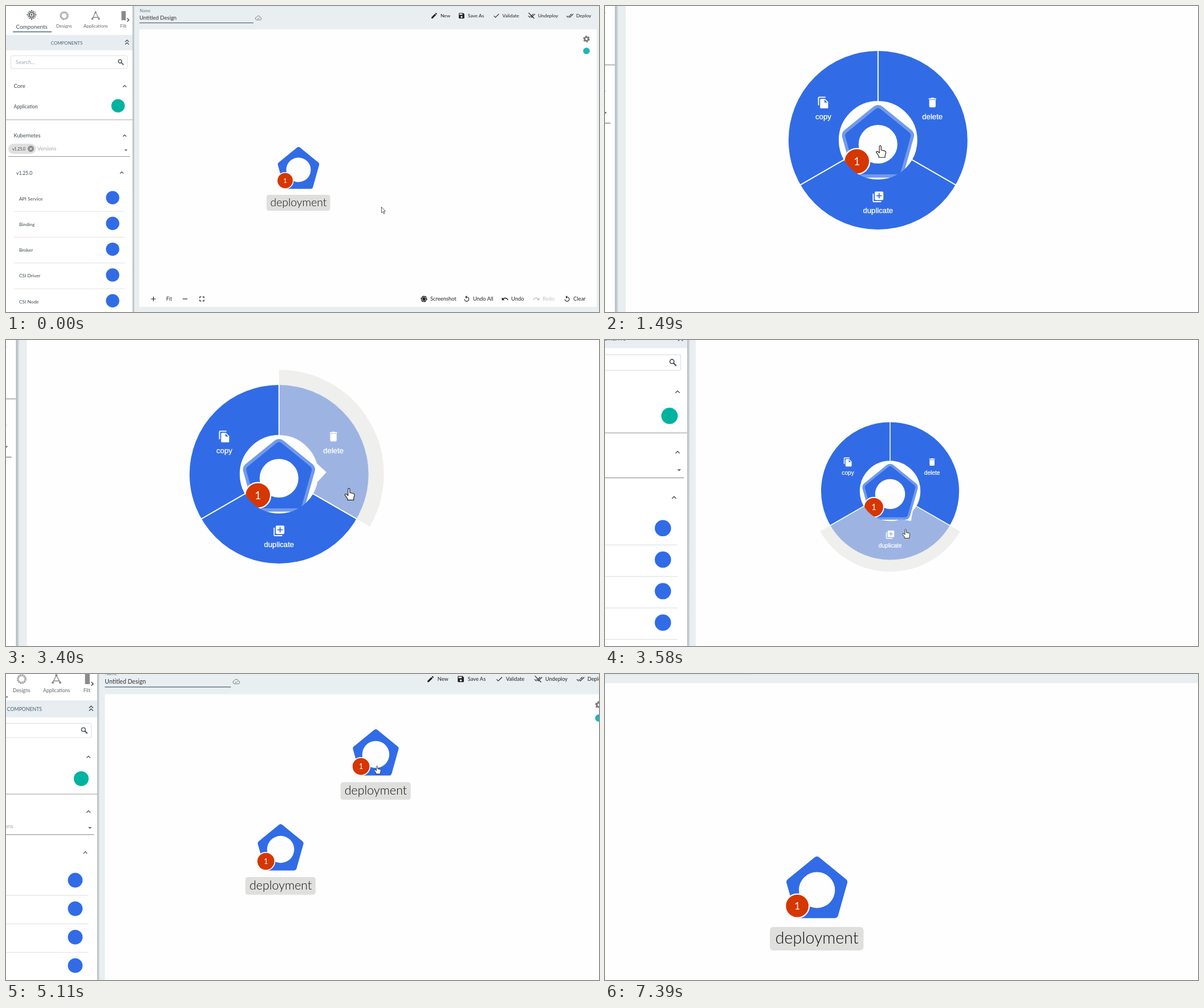
Write an HTML page that moves like this. It is 1040 px wide and 538 px high and loops after 8050 ms.

```html
<!DOCTYPE html>
<html lang="en">
<head>
<meta charset="utf-8">
<title>Design canvas</title>
<style>
  html, body { margin: 0; width: 100%; height: 100%; overflow: hidden; background: #fefefe; }
  svg { display: block; width: 100%; height: 100%; }
  text { font-family: Lato, sans-serif; white-space: pre; }
  .menu text { font-family: "Liberation Sans", Arial, sans-serif; stroke: #fff; stroke-width: .2px; }
</style>
</head>
<body>
<svg id="stage" viewBox="0 0 1040 538" xmlns="http://www.w3.org/2000/svg"></svg>
<script>
const LOOP = 8050;
const BLUE = '#316ce6', INK = '#3c494f', SLATE = '#607d8b';
const CENTER = [513, 283.6];
const COPY_SHIFT = [151, -151];
const SPOT = 43.5, RIM = 99, GLOW = 116;

const ICONS = {
  edit: 'M3 17.25V21h3.75L17.81 9.94l-3.75-3.75L3 17.25zM20.71 7.04c.39-.39.39-1.02 0-1.41l-2.34-2.34c-.39-.39-1.02-.39-1.41 0l-1.83 1.83 3.75 3.75 1.83-1.83z',
  save: 'M17 3H5c-1.11 0-2 .9-2 2v14c0 1.1.89 2 2 2h14c1.1 0 2-.9 2-2V7l-4-4zm-5 16c-1.66 0-3-1.34-3-3s1.34-3 3-3 3 1.34 3 3-1.34 3-3 3zm3-10H5V5h10v4z',
  check: 'M9 16.2L4.8 12l-1.4 1.4L9 19 21 7l-1.4-1.4z',
  checks: 'M18 7l-1.41-1.41-6.34 6.34 1.41 1.41zM22.24 5.59L11.66 16.17 7.48 12l-1.41 1.41L11.66 19l12-12zM.41 13.41L6 19l1.41-1.41L1.83 12z',
  plus: 'M19 13h-6v6h-2v-6H5v-2h6V5h2v6h6z',
  minus: 'M19 13H5v-2h14z',
  full: 'M7 14H5v5h5v-2H7zM5 10h2V7h3V5H5zM17 17h-3v2h5v-5h-2zM14 5v2h3v3h2V5z',
  undo: 'M12.5 8c-2.65 0-5.05.99-6.9 2.6L2 7v9h9l-3.62-3.62c1.39-1.16 3.16-1.88 5.12-1.88 3.54 0 6.55 2.31 7.6 5.5l2.37-.78C21.08 11.03 17.15 8 12.5 8z',
  replay: 'M12 5V1L7 6l5 5V7c3.31 0 6 2.69 6 6s-2.69 6-6 6-6-2.69-6-6H4c0 4.42 3.58 8 8 8s8-3.58 8-8-3.58-8-8-8z',
  copy: 'M16 1H4c-1.1 0-2 .9-2 2v14h2V3h12zM15 5l6 6v10c0 1.1-.9 2-2 2H8c-1.1 0-2-.9-2-2V7c0-1.1.9-2 2-2zm-1 7h5.5L14 6.5z',
  trash: 'M6 19c0 1.1.9 2 2 2h8c1.1 0 2-.9 2-2V7H6zM19 4h-3.5l-1-1h-5l-1 1H5v2h14z',
  duplicate: 'M4 6H2v14c0 1.1.9 2 2 2h14v-2H4zM20 2H8c-1.1 0-2 .9-2 2v12c0 1.1.9 2 2 2h12c1.1 0 2-.9 2-2V4c0-1.1-.9-2-2-2zm-1 9h-4v4h-2v-4H9V9h4V5h2v4h4z'
};

const text = (x, y, size, str, fill = INK, more = '') =>
  `<text x="${x}" y="${y}" font-size="${size}" fill="${fill}" ${more}>${str}</text>`;
const rect = (x, y, w, h, fill, more = '') =>
  `<rect x="${x}" y="${y}" width="${w}" height="${h}" fill="${fill}" ${more}/>`;
const disc = (x, y, r, fill, more = '') => `<circle cx="${x}" cy="${y}" r="${r}" fill="${fill}" ${more}/>`;
const line = (d, stroke = INK, width = 1) =>
  `<path d="${d}" fill="none" stroke="${stroke}" stroke-width="${width}"/>`;
const icon = (name, x, y, size, fill = '#222', flip = 1) =>
  `<path d="${ICONS[name]}" fill="${fill}" transform="translate(${x} ${y}) scale(${flip * size / 24} ${size / 24}) translate(-12 -12)"/>`;
const chevron = (x, y) => line(`M${x - 3} ${y + 2}l3-3 3 3`, INK, 1.1);
const middle = 'text-anchor="middle"';

function tabs() {
  const arms = [0, 90, 180, 270].map(a => `<g transform="rotate(${a} 45 15.5)">` +
    line('M45 11V7.5M43 11V9.5H40M47 11V9.5H50', INK, 1) +
    disc(45, 8, 1.1, INK) + '</g>').join('');
  const blades = [0, 60, 120, 180, 240, 300].map(a =>
    `<path d="M98.5 13.5L105 10.5" stroke="#999" transform="rotate(${a} 102 17)"/>`).join('');
  return rect(41.5, 12, 7, 7, '#fff', `stroke="${INK}" stroke-width="1.3"`) + arms +
    disc(45, 15.5, 1.4, INK) +
    disc(102, 17, 6.7, 'none', 'stroke="#999" stroke-width="1.8" stroke-dasharray="2.6 .9"') + blades +
    line('M157 11L151.5 22M157 11L163 22M152 20H162', '#888', 1.3) +
    disc(157, 11, 1.8, '#888') + disc(151.5, 22.5, 1.8, '#888') + disc(163, 22.5, 1.8, '#888') +
    rect(202.5, 9, 7.5, 16, '#8a8a8a') + line('M212.5 21.5l3 3-3 3', '#333', 1.2) +
    text(17.5, 40, 9.9, 'Components') + text(88, 37.5, 8, 'Designs', '#666') +
    text(136, 37.5, 7.9, 'Applications', '#666') + text(200, 37.5, 8, 'Filt', '#666') +
    rect(12, 44.5, 68, 1.8, SLATE);
}

function sidebar() {
  const rows = ['API Service', 'Binding', 'Broker', 'CSI Driver', 'CSI Node'].map((name, i) => {
    const y = 337 + 45.3 * i;
    return text(23, y + 4.5, 8.3, name) + disc(187, y, 11.7, BLUE) +
      (i < 4 ? rect(14, y + 23.7, 194, 1, '#e2e2e2') : '');
  }).join('');
  return rect(0, 0, 222, 538, '#fff') + tabs() +
    rect(0, 51, 222, 27, '#e8edf1') + text(106.5, 67.5, 7.9, 'COMPONENTS', '#47626f', middle) +
    line('M209 63l3.2-3.2 3.2 3.2M209 67.5l3.2-3.2 3.2 3.2', INK, 1.2) +
    rect(8.5, 87.5, 204, 22.5, '#fff', 'rx="2" stroke="#dcdfe1"') +
    text(17, 102, 9.2, 'Search...', '#a3a8ab') +
    disc(200, 97.3, 3, 'none', `stroke="${INK}" stroke-width="1.3"`) + line('M202.2 99.5l4 4', INK, 1.7) +
    text(13.5, 144, 9.7, 'Core') + chevron(208, 140.5) +
    text(13.5, 180, 8.5, 'Application') + disc(196.5, 175.5, 11.8, '#00b39f') +
    rect(0, 199.5, 222, 1, '#a5a5a5') +
    text(13.5, 231, 9.3, 'Kubernetes') + chevron(208, 227.5) +
    rect(4, 242, 48.5, 18, '#e0e0e0', 'rx="9"') + text(11, 253.7, 7, 'v1.25.0') +
    disc(43.5, 251, 5.4, '#888') + line('M41.5 249l4 4M45.5 249l-4 4', '#e0e0e0', 1.2) +
    text(55, 254.3, 9, 'Versions', '#a3a8ab') + `<path d="M207.5 252.3h5.6l-2.8 2.9z" fill="#666"/>` +
    rect(4, 264.1, 213, 1, '#929292') +
    text(18, 296.5, 8.5, 'v1.25.0') + chevron(203, 292.5) + rows +
    rect(222, 0, 4, 538, 'url(#edge)');
}

function header() {
  const tools = [['edit', 751, 762, 'New'], ['save', 799, 810, 'Save As'], ['check', 860, 870.5, 'Validate'],
    ['checks', 922, 933, 'Undeploy'], ['checks', 989, 1000, 'Deploy']];
  return text(234.5, 10.8, 7.3, 'Name', SLATE) + text(234, 24, 9.5, 'Untitled Design', '#333') +
    rect(234, 29, 200, 1.2, '#536b78') +
    line('M439.5 24.5a2.7 2.7 0 0 1-.2-5.2 3.7 3.7 0 0 1 6.7.5 2.4 2.4 0 0 1 0 4.7zM440.5 21.3l1.7 1.6 2.7-2.8', '#777', .9) +
    tools.map(([name, ix, tx, label]) => icon(name, ix, 17, 13) + text(tx, 20, 8.4, label, '#222')).join('') +
    line('M916.5 12l10 10', '#222', 1.1);
}

function toolbar() {
  const tools = [['replay', 808, 819, 'Undo All'], ['undo', 875, 886, 'Undo'],
    ['undo', 930, 941, 'Redo', '#c4c4c4', -1], ['replay', 984, 995, 'Clear']];
  const blades = [0, 60, 120, 180, 240, 300].map(a =>
    `<path d="M731 513L735 509" stroke="#fefefe" stroke-width=".8" transform="rotate(${a} 733 515)"/>`).join('');
  return icon('plus', 258.5, 515, 14) + icon('minus', 314, 515, 14) + icon('full', 343.5, 515, 14.5) +
    text(281, 518, 8.6, 'Fit', '#222') +
    disc(733, 515, 5.6, '#222') + blades + text(744, 518, 9.4, 'Screenshot', '#222') +
    tools.map(([name, ix, tx, label, fill = '#222', flip = 1]) =>
      icon(name, ix, 515, 13, fill, flip) + text(tx, 518, 9.4, label, fill)).join('');
}

function workspace() {
  return rect(222, 0, 818, 538, '#e9eef1') + rect(222, 0, 818, 1, '#dde3e6') +
    rect(234, 41, 802, 488, '#fefefe', 'rx="1"') + header() + toolbar() +
    disc(1018, 58, 3.3, 'none', 'stroke="#777" stroke-width="2.6"') +
    disc(1018, 58, 5.1, 'none', 'stroke="#777" stroke-width="1.6" stroke-dasharray="2.67"') +
    disc(1018, 79, 5.8, '#20b5b5');
}

function node(id) {
  const body = 'M513 252.5L544.8 278.5 534 317H492L481.2 278.5Z';
  const shape = (color, width) =>
    `<path d="${body}" fill="${color}" stroke="${color}" stroke-width="${width}" stroke-linejoin="round"/>`;
  return `<g id="${id}">${rect(457, 332, 111.5, 28, '#dfdfde', 'rx="4"')}
    ${text(513, 352, 19.4, 'deployment', '#111', middle + ' font-weight="300"')}
    <g class="selected">${shape('#719aeb', 16)}</g>${shape(BLUE, 9)}${disc(513, 288, 21.5, '#fefefe')}
    ${disc(489.6, 307, 14.2, '#d63600', 'stroke="#fff" stroke-width="1.5"')}
    ${text(489.6, 311.2, 12, '1', '#fff', middle)}</g>`;
}

function menu() {
  const ringRadius = (SPOT + RIM) / 2, glowRadius = (SPOT + GLOW) / 2;
  const spokes = [0, 120, 240].map(a =>
    `<path d="M0 ${-SPOT}V${-RIM}" stroke="#fff" stroke-width="1.25" transform="rotate(${a})"/>`).join('');
  const command = (name, x, y, label) =>
    icon(name, x, y, 14.2, '#fff') + text(x, y + 18.2, 8.3, label, '#fff', middle);
  return `<g id="menu" class="menu"><g mask="url(#notch)">
    ${disc(0, 0, ringRadius, 'none', `stroke="${BLUE}" stroke-width="${RIM - SPOT}"`)}
    <path id="glow" d="M0 ${-glowRadius}A${glowRadius} ${glowRadius} 0 0 1 ${glowRadius * Math.sqrt(3) / 2} ${glowRadius / 2}"
      fill="none" stroke="rgb(228,228,226)" stroke-opacity=".6" stroke-width="${GLOW - SPOT}"/>${spokes}</g>
    ${command('copy', -60.5, -41.8, 'copy')}${command('trash', 60.2, -41.8, 'delete')}
    ${command('duplicate', 0, 62.8, 'duplicate')}</g>`;
}

const stage = document.getElementById('stage');
stage.innerHTML = `<defs>
  <linearGradient id="edge"><stop stop-color="#a9b1b5"/><stop offset="1" stop-color="#e9eef1"/></linearGradient>
  <mask id="notch" maskUnits="userSpaceOnUse" x="-120" y="-120" width="240" height="240">
    ${rect(-120, -120, 240, 240, '#fff')}<path id="pointer" d="M52.5 0L41 -11.5V11.5Z" fill="#000"/></mask></defs>
  <g id="view">${workspace()}${sidebar()}${node('first')}${node('second')}${menu()}
  ${rect(693, 6, 302, 254, '#fcfcfc', 'id="panel" rx="2" stroke="#efefef"')}
  <g id="cursor" stroke="#222" stroke-width=".75" fill="#fff" stroke-linejoin="round">
    <path id="arrow" d="M0 0V10.2L2.4 8 4 11.8 5.6 11.1 4 7.4H7Z"/>
    <path id="hand" d="M-1 1Q0-.9 1 1V5L5.2 6Q6.3 6.4 6.2 8L5.3 11V13.2H-1.6V11.6L-4.4 7.6Q-4.5 6-2.8 6.6L-1 8.2Z"/></g></g>`;
const el = Object.fromEntries([...stage.querySelectorAll('[id]')].map(e => [e.id, e]));
const rings = ['first', 'second'].map(id => el[id].querySelector('.selected'));
el.second.setAttribute('transform', `translate(${COPY_SHIFT})`);

// Time, scale and offset of the camera.
const VIEW = [[830, 1, 0, 0], [1330, 1.585, -334.3, -213.5], [3430, 1.585, -334.3, -213.5], [3690, 1, 0, 0],
  [4980, 1, 0, 0], [5410, 1.473, -384, -44.4]];
const TO_NODE = [[860, 658.5, 353.5], [1330, 515.5, 289.5]];
// Radius and clockwise angle around the first node.
const SWEEP = [[1820, 6.4, 66 - 90], [2050, 50, -62], [2440, 60, 46], [2610, 62, 100], [3400, 79, 371], [3690, 47, 462]];
const AFTER = [[3860, 503.2, 329.6], [3980, 512, 341], [4180, 512, 341], [4330, 554, 338], [4950, 666, 154.8],
  [6090, 666, 154.8], [6330, 719, 134], [7120, 719, 134], [7360, 906, 378]];

function sample(keys, t, ease = u => u) {
  if (t <= keys[0][0]) return keys[0].slice(1);
  const i = keys.findIndex(k => k[0] > t);
  if (i < 0) return keys[keys.length - 1].slice(1);
  const [a, b] = [keys[i - 1], keys[i]];
  const u = ease((t - a[0]) / (b[0] - a[0]));
  return a.slice(1).map((v, n) => v + (b[n + 1] - v) * u);
}
const smooth = u => u * u * (3 - 2 * u);

function cursorAt(t) {
  if (t < 1820) return sample(TO_NODE, t, smooth);
  if (t >= 3690) return sample(AFTER, t, smooth);
  const [r, angle] = sample(SWEEP, t);
  const rad = angle * Math.PI / 180;
  return [CENTER[0] + r * Math.cos(rad), CENTER[1] + r * Math.sin(rad)];
}

const show = (e, on) => e.setAttribute('display', on ? 'inline' : 'none');

function draw(t) {
  const [s, x, y] = sample(VIEW, t, smooth);
  el.view.setAttribute('transform', `translate(${x} ${y}) scale(${s})`);

  const firstOpen = t >= 1490 && t < 4180;
  const secondOpen = t >= 5790 && t < 6680;
  const open = firstOpen || secondOpen;
  const hasCopy = t >= 4250 && t < 6680;
  const center = t < 4180 ? CENTER : CENTER.map((v, i) => v + COPY_SHIFT[i]);
  show(el.second, hasCopy);
  show(rings[0], firstOpen);
  show(rings[1], secondOpen);
  show(el.panel, t >= 4290 && t < 4500);

  // The menu follows the cursor with a short delay.
  show(el.menu, open);
  el.menu.setAttribute('transform', `translate(${center})`);
  const [dx, dy] = cursorAt(t - 40).map((v, i) => v - center[i]);
  const angle = Math.atan2(dy, dx) * 180 / Math.PI;
  const active = Math.hypot(dx, dy) > SPOT;
  show(el.glow, active);
  show(el.pointer, active);
  el.glow.setAttribute('transform', `rotate(${120 * Math.floor((angle + 450) % 360 / 120)})`);
  el.pointer.setAttribute('transform', `rotate(${angle})`);

  const [cx, cy] = cursorAt(t);
  const overNode = (t < 4180 || hasCopy) && Math.hypot(cx - center[0], cy - center[1]) < 36;
  show(el.cursor, t < 7390);
  show(el.hand, open || overNode);
  show(el.arrow, !(open || overNode));
  el.cursor.setAttribute('transform', `translate(${cx} ${cy})`);
}

const start = performance.now();
function tick() {
  draw((performance.now() - start) % LOOP);
  requestAnimationFrame(tick);
}
tick();
</script>
</body>
</html>
```
